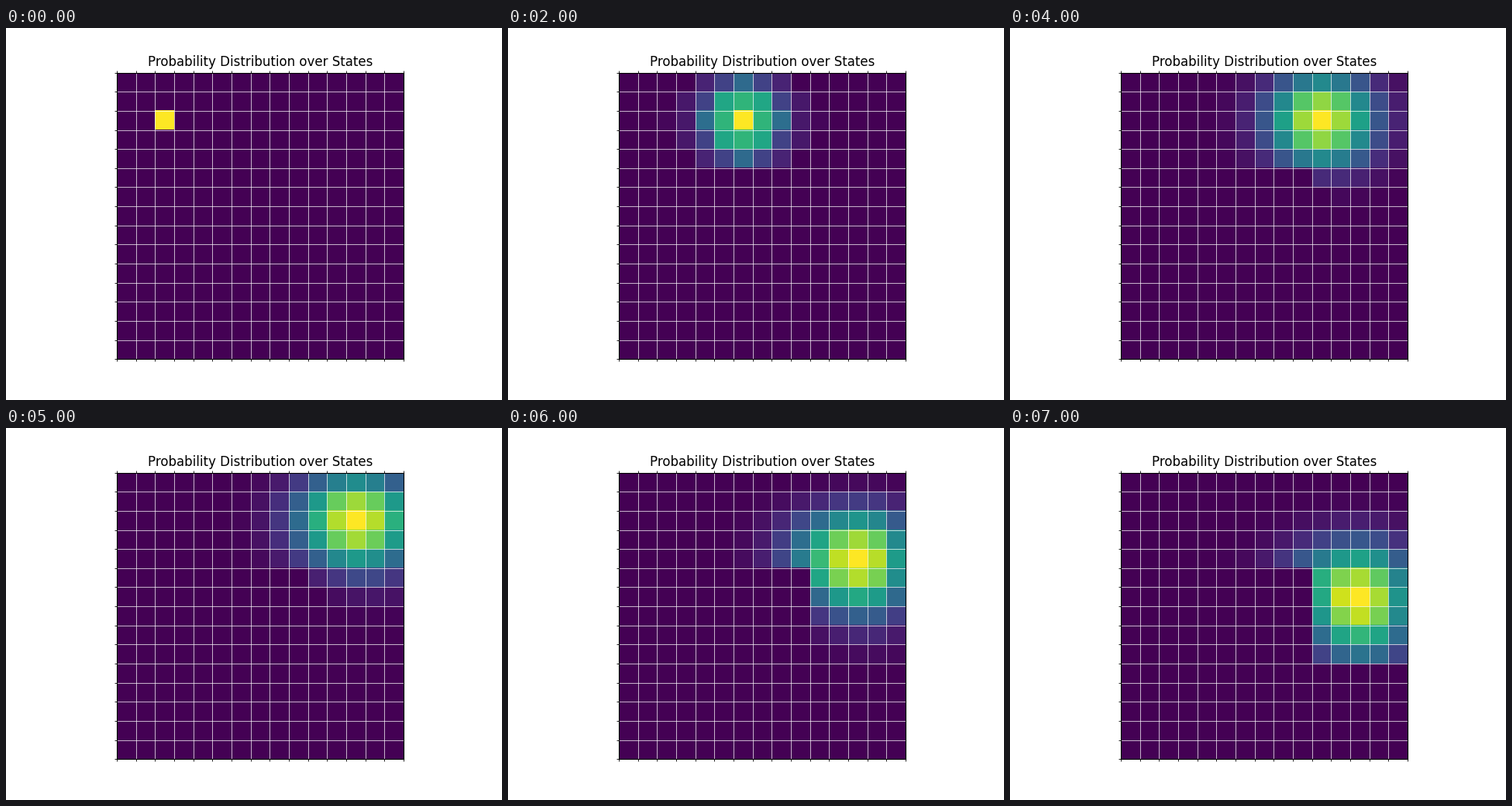
Recreate the animation shown at these times as a matplotlib script. Size 640 px wide and 480 px high, loop 7.5 s.

```python
import matplotlib.pyplot as plt
import numpy as np
from matplotlib.animation import FuncAnimation

SIZE = 15
START = (2, 2)
RIGHT, DOWN = (0, 1), (1, 0)
ACTIONS = [RIGHT] * 10 + [DOWN] * 4
NOISE = [(0, 0), (0, 1), (0, -1), (1, 0), (-1, 0)]

# L-shaped free space: a corridor along the top, then a room below its right end
free = np.zeros((SIZE, SIZE))
free[:5, :] = 1
free[5:10, 10:] = 1


def shifted(p, dy, dx):
    """Move a grid by up to two cells, dropping what leaves it."""
    padded = np.pad(p, 2)
    return padded[2 - dy:2 - dy + SIZE, 2 - dx:2 - dx + SIZE]


def predict(p, action):
    """Apply an action with uniform noise; mass landing in walls is lost."""
    ay, ax_ = action
    p = sum(shifted(p, ay + ny, ax_ + nx) for ny, nx in NOISE) * free
    return p / p.sum()


belief = np.zeros((SIZE, SIZE))
belief[START] = 1
beliefs = [belief]
for action in ACTIONS:
    beliefs.append(predict(beliefs[-1], action))

fig, ax = plt.subplots(figsize=(6.4, 4.8), dpi=100)
image = ax.imshow(beliefs[0], cmap="viridis", interpolation="nearest", vmin=0, vmax=1)
ax.set_title("Probability Distribution over States", y=1)

edges = np.arange(-0.5, SIZE, 1)
ax.set_xticks([])
ax.set_yticks([])
ax.set_xticks(edges, minor=True)
ax.set_yticks(edges, minor=True)
ax.tick_params(which="minor", top=True, bottom=True, left=True)
ax.grid(which="minor", color="white", linestyle="-", linewidth=0.5)


def update(i):
    image.set_data(beliefs[i])
    image.set_clim(0, beliefs[i].max())
    return [image]


anim = FuncAnimation(fig, update, frames=len(beliefs), interval=500,
                     repeat=True, repeat_delay=0, blit=False)
plt.show()
```
